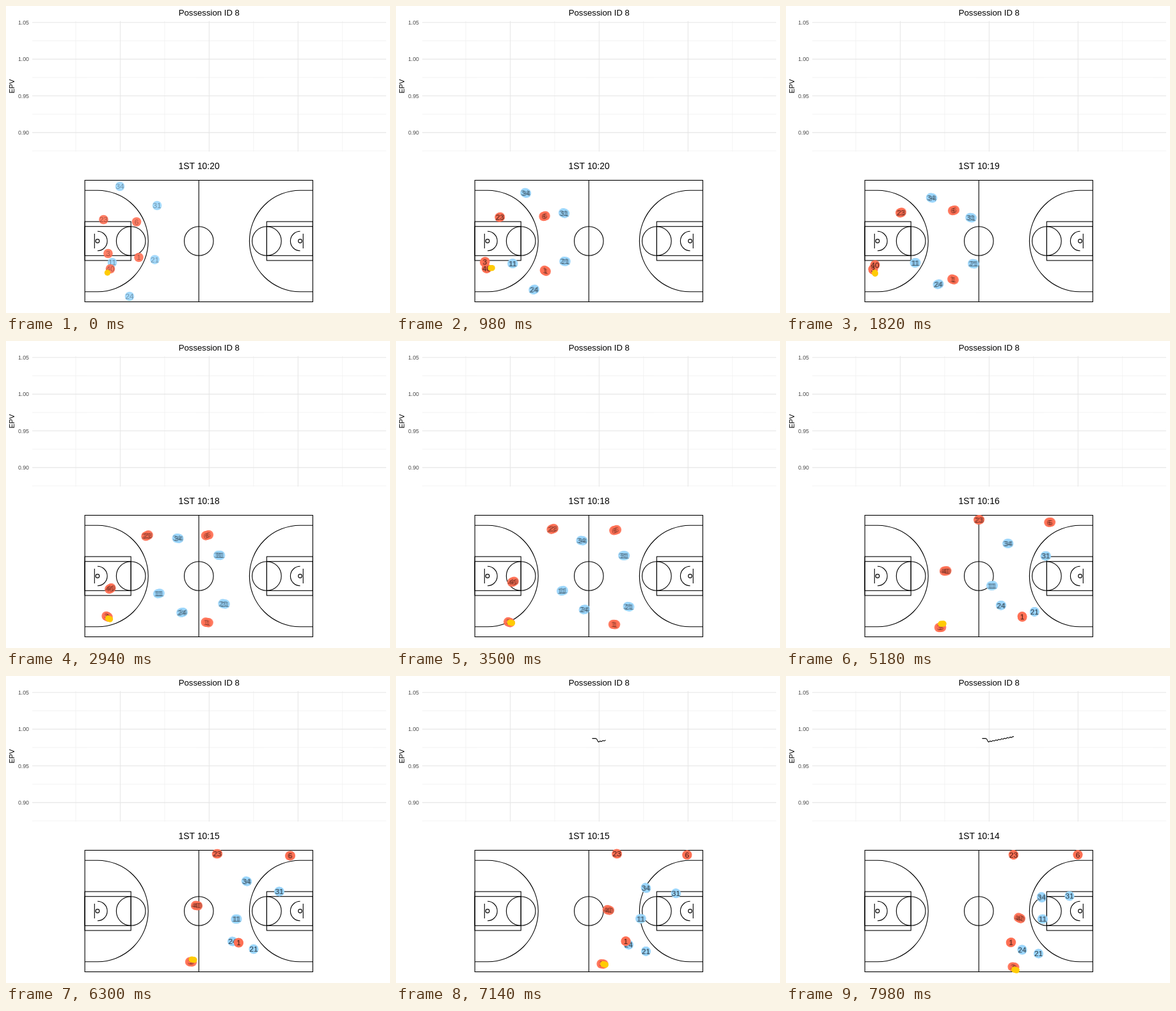
An HTML page with a canvas for the animation above (8 s loop, 600 px wide and 480 px high).

```html
<!DOCTYPE html>
<html lang="en">
<head>
<meta charset="utf-8">
<title>Possession ID 8</title>
<style>
html, body { margin: 0; width: 100%; height: 100%; overflow: hidden; background: #fff; }
canvas { display: block; }
</style>
</head>
<body>
<canvas id="stage" width="600" height="480"></canvas>
<script>
const ctx = document.getElementById('stage').getContext('2d');
const FONT = '"Liberation Sans", Arial, sans-serif';
const LOOP = 8000, STEP = 140, TAU = Math.PI * 2;

// Steps at which players pass their waypoints
const KEYS = [0, 13, 29, 45, 57];

// A few waypoints per jersey: x, y pairs
const BLUE = {
  j34: [178, 282, 227.5, 300, 310.5, 315, 376, 321, 399.5, 346],
  j31: [236, 312, 289, 331, 376, 336, 427, 337, 443, 344],
  j11: [166, 401, 202, 401.5, 280.5, 387, 360, 380, 401, 380],
  j21: [232.5, 396.5, 293, 403, 380, 419, 387, 427, 394.5, 434],
  j24: [193, 454, 238, 435, 311, 416.5, 354, 415, 369, 428]
};
const RED = {
  j23: [152.5, 334, 179.5, 323, 266, 286, 330, 278, 355.5, 279.5],
  j6: [204, 337.5, 262, 319.5, 368, 289.5, 444, 281, 456, 279.5],
  j3: [159.5, 387, 136, 412, 196.5, 446, 289, 447, 355.5, 455],
  j1: [207.5, 393, 261, 427.5, 360, 443.5, 363.5, 417, 351.5, 416.5],
  j40: [163, 411, 139, 405, 203.5, 368.5, 298, 359, 365, 378.5]
};

const mix = (a, b, u) => a + (b - a) * u;
const ease = u => u * u * (3 - 2 * u);

// Slope at waypoint k of one coordinate
function slope(v, k) {
  const rate = j => (v(j + 1) - v(j)) / (KEYS[j + 1] - KEYS[j]);
  const last = KEYS.length - 1;
  if (k === 0) return 2 * rate(0) - slope(v, 1);
  if (k === last) return 2 * rate(last - 1) - slope(v, last - 1);
  const a = KEYS[k] - KEYS[k - 1], b = KEYS[k + 1] - KEYS[k];
  return (rate(k - 1) * b + rate(k) * a) / (a + b);
}

function along(path, axis, s) {
  let k = 0;
  while (k < KEYS.length - 2 && s >= KEYS[k + 1]) k++;
  const v = j => path[2 * j + axis];
  const span = KEYS[k + 1] - KEYS[k], u = (s - KEYS[k]) / span;
  return mix(v(k), v(k + 1), ease(u)) +
    span * u * (1 - u) * ((1 - u) * slope(v, k) - u * slope(v, k + 1));
}

const place = (path, s) => [along(path, 0, s), along(path, 1, s)];

// The ball is passed to jersey 3, then swings around him
function ballAt(s) {
  const [x, y] = place(RED.j3, s), got = ease(Math.min(1, s / 13));
  const swing = 5.8 * Math.cos(TAU * (s - 14) / 48);
  return [mix(158.5, x + 3, got), mix(417, y + swing, got)];
}

// Expected value: flat, a sudden dip, then a wavering climb
function epvAt(u) {
  const dip = 1 / (1 + Math.exp(-1.6 * (u - 8)));
  return 97.6 + dip * (5.6 - 0.2 * (u - 8) + 0.5 * Math.sin(1.4 * u));
}

function text(str, x, y, size, color, align = 'center') {
  ctx.font = size + 'px ' + FONT;
  ctx.fillStyle = color;
  ctx.textAlign = align;
  ctx.fillText(str, x, y);
}

function line(x1, y1, x2, y2) {
  ctx.beginPath();
  ctx.moveTo(x1, y1);
  ctx.lineTo(x2, y2);
  ctx.stroke();
}

function ring(x, y, r, from = 0, to = TAU) {
  ctx.beginPath();
  ctx.arc(x, y, r, from, to);
  ctx.stroke();
}

function dot(x, y, r, color) {
  ctx.fillStyle = color;
  ctx.beginPath();
  ctx.arc(x, y, r, 0, TAU);
  ctx.fill();
}

function grid(x0, y0, color, width) {
  ctx.strokeStyle = color;
  ctx.lineWidth = width;
  for (let x = x0; x < 594; x += 138.9) line(x, 23.5, x, 227.5);
  for (let y = y0; y < 228; y += 57.4) line(41, y, 594, y);
}

function chart(step) {
  grid(109, 54.4, '#f0f0f0', 0.8);
  grid(178.5, 25.7, '#e6e6e6', 1.07);
  for (let i = 0; i < 4; i++) {
    text((1.05 - i * 0.05).toFixed(2), 36, 29 + i * 57.4, 8.8, '#4d4d4d', 'right');
  }
  text('Possession ID 8', 317.3, 15, 13.2, '#000');
  ctx.save();
  ctx.translate(13.3, 125.5);
  ctx.rotate(-Math.PI / 2);
  text('EPV', 0, 0, 11, '#000');
  ctx.restore();

  const reach = 49.5 * (step * STEP - 6500) / 1480;
  ctx.strokeStyle = '#000';
  ctx.lineWidth = 1.1;
  ctx.beginPath();
  for (let u = 0; u <= reach; u += 0.5) ctx.lineTo(306.5 + u, epvAt(u));
  ctx.stroke();
}

function halfCourt() {
  const mid = 367.5, q = Math.PI / 2;
  ctx.strokeRect(123.2, 337.1, 72, 60.8);
  ctx.strokeRect(123.2, 344.7, 72, 45.6);
  ring(195.2, mid, 22.8);
  ring(143, mid, 2.9);
  ring(143, mid, 15.2, -q, q);
  line(138.3, mid - 11.4, 138.3, mid + 11.4);
  ctx.beginPath();
  ctx.moveTo(123.2, mid - 79.2);
  ctx.arc(143, mid, 79.2, -q, q);
  ctx.lineTo(123.2, mid + 79.2);
  ctx.stroke();
}

function court() {
  ctx.strokeStyle = '#000';
  ctx.lineWidth = 1.1;
  ctx.strokeRect(123.2, 272.5, 356.2, 190);
  line(301.3, 272.5, 301.3, 462.5);
  ring(301.3, 367.5, 22.8);
  halfCourt();
  ctx.save();
  ctx.translate(602.6, 0);
  ctx.scale(-1, 1);
  halfCourt();
  ctx.restore();
}

function team(players, color, ticks) {
  for (const id in players) {
    for (const s of ticks) dot(...place(players[id], s), 7.3, color);
  }
  for (const id in players) {
    for (const s of ticks) {
      const [x, y] = place(players[id], s);
      text(id.slice(1), x, y + 4.2, 11.8, 'rgba(0,0,0,0.32)');
    }
  }
}

function draw(step) {
  ctx.fillStyle = '#fff';
  ctx.fillRect(0, 0, 600, 480);
  chart(step);

  const gone = Math.max(0, Math.floor((step - 10) * 3 / 25) + 1);
  text('1ST 10:' + (20 - gone), 301.6, 255.2, 13.9, '#000');
  court();

  // Each step shows three tracking samples, the opening one a single sample
  const ticks = step ? [-1, 0, 1].map(d => step + d / 3) : [0];
  team(BLUE, 'rgba(155,214,252,0.9)', ticks);
  team(RED, 'rgba(255,112,84,0.9)', ticks);
  for (const s of ticks) dot(...ballAt(s), 4.7, '#ffcb05');
}

function tick(now) {
  draw(Math.floor(now % LOOP / STEP));
  requestAnimationFrame(tick);
}
draw(0);
requestAnimationFrame(tick);
</script>
</body>
</html>
```
